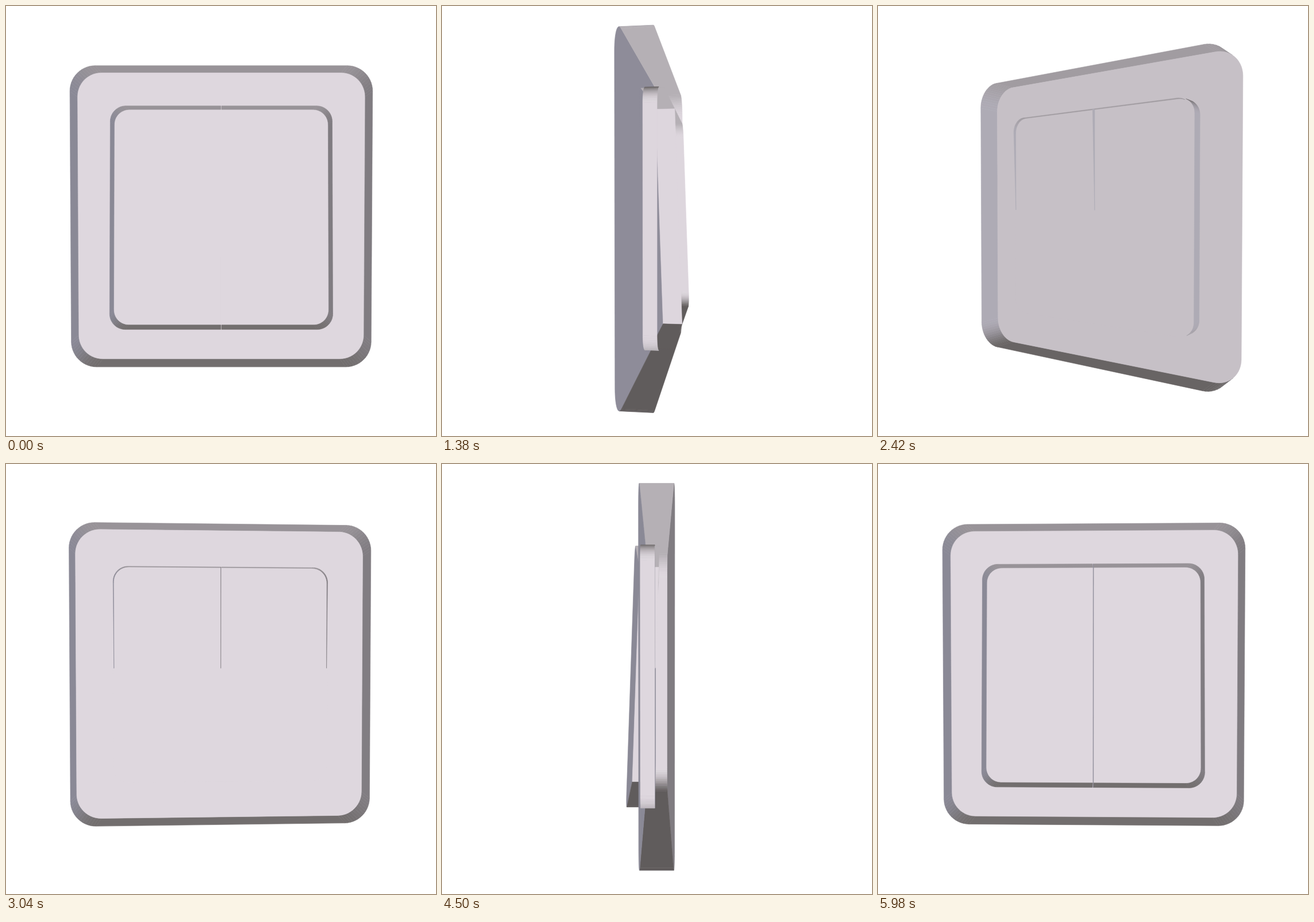
An HTML page with a canvas for the animation above (6 s loop, 748x748 px).

```html
<!DOCTYPE html>
<html lang="en">
<head>
<meta charset="utf-8">
<title>Rotating switch</title>
<style>
html, body { margin: 0; height: 100%; overflow: hidden; background: #fff; }
canvas { display: block; }
</style>
</head>
<body>
<canvas id="stage" width="748" height="748"></canvas>
<script>
const ctx = document.getElementById('stage').getContext('2d');
const LOOP = 6000, STEP = 20;
const CX = 374.4, CY = 366.8, DIST = 910, PITCH = 0.02;
const FRONT = -23.4, BACK = 21.8, FLOOR = -3.5, TILT = 0.035;
const rockerFront = y => -37 - TILT * y;
const rockerBack = y => -3.9 - TILT * y;
const level = w => () => w;
let cos = 1, sin = 0;

// Clockwise rounded rectangle with separate left and right corner radii.
function outline(x0, x1, h, rl, rr) {
  const pts = [];
  const corner = (x, y, r, start) => {
    const n = r ? 14 : 0;
    for (let i = 0; i <= n; i++) {
      const a = (start + (n ? i / n : 0)) * Math.PI / 2;
      pts.push([x + r * Math.cos(a), y + r * Math.sin(a)]);
    }
  };
  corner(x0 + rl, rl - h, rl, 2);
  corner(x1 - rr, rr - h, rr, 3);
  corner(x1 - rr, h - rr, rr, 0);
  corner(x0 + rl, h - rl, rl, 1);
  return pts;
}

const plate = outline(-255.3, 255.3, 255.3, 43, 43);
const hole = outline(-187.3, 187.3, 187.5, 26, 26);
const rockers = [outline(-185.7, -0.6, 186.4, 26, 0), outline(0.6, 185.7, 186.4, 0, 26)];
// Upper part of each rocker that reaches below the recess floor.
const sinkY = (rockerBack(0) - FLOOR) / TILT;
const sunk = rockers.map(pts => pts.map(([x, y]) => [x, Math.min(y, sinkY)]));

function project(x, y, w) {
  const depth = x * sin + w * cos;
  const s = DIST / (DIST + depth + y * PITCH);
  return [CX + (x * cos - w * sin) * s, CY + (y - depth * PITCH) * s];
}

const mix = (a, b, k) => a.map((v, i) => v + (b[i] - v) * k);

// Colour for a local normal that points towards the viewer.
function shade(nx, ny, nw) {
  const side = nx * cos - nw * sin;
  const len = Math.hypot(nx, nw) || 1;
  const facing = Math.max(0, -(nx * sin + nw * cos) / len);
  let c = mix(side > 0 ? [138, 137, 150] : [128, 124, 129], [222, 215, 222], facing ** 1.5);
  if (ny) {
    const v = ny > 0 ? 152 + 29 * sin * sin : 96 + 18 * cos ** 4;
    c = mix(c, ny > 0 ? [v, v - 5, v] : [v, v - 4, v - 4], ny * ny);
  }
  return `rgb(${c.map(Math.round)})`;
}

function area(p) {
  return p.reduce((sum, [x, y], i) => {
    const [u, v] = p[(i + 1) % p.length];
    return sum + x * v - u * y;
  }, 0);
}

function paint(loops, color) {
  ctx.beginPath();
  for (const loop of loops) {
    loop.forEach(([x, y], i) => i ? ctx.lineTo(x, y) : ctx.moveTo(x, y));
    ctx.closePath();
  }
  ctx.fillStyle = ctx.strokeStyle = color;
  ctx.fill('evenodd');
  ctx.stroke();
}

const flat = (pts, w) => pts.map(([x, y]) => project(x, y, w(y)));

// Only surfaces turned away from the viewer are drawn; dir is -1 for a recess.
function walls(pts, front, back, dir = 1) {
  const f = flat(pts, front), b = flat(pts, back);
  pts.forEach(([x, y], i) => {
    const j = (i + 1) % pts.length;
    const dx = pts[j][0] - x, dy = pts[j][1] - y, len = Math.hypot(dx, dy);
    const quad = [f[j], f[i], b[i], b[j]];
    if (len > 1e-6 && area(quad) * dir < -0.01)
      paint([quad], shade(-dir * dy / len, dir * dx / len, 0));
  });
}

function frontCap(pts, w, inner) {
  const cap = flat(pts, w);
  if (area(cap) < 0) paint(inner ? [cap, flat(inner, w)] : [cap], shade(0, 0, 1));
}

function backCap(pts, w) {
  const cap = flat(pts, w);
  if (area(cap) > 0) paint([cap], shade(0, 0, -1));
}

function drawPlate() {
  backCap(plate, level(BACK));
  walls(plate, level(FRONT), level(BACK));
  frontCap(plate, level(FRONT), hole);
}

function drawRocker(pts) {
  backCap(pts, rockerBack);
  frontCap(pts, rockerFront);
  walls(pts, rockerFront, rockerBack);
}

function draw(time) {
  const turn = time / LOOP * 2 * Math.PI;
  cos = Math.cos(turn);
  sin = Math.sin(turn);
  ctx.fillStyle = '#fff';
  ctx.fillRect(0, 0, 748, 748);
  ctx.lineWidth = 0.6;
  ctx.lineJoin = 'round';

  const farFirst = sin > 0 ? [1, 0] : [0, 1];
  const fromBehind = -DIST * cos > FLOOR;
  if (!fromBehind) drawPlate();
  farFirst.forEach(i => drawRocker(rockers[i]));
  if (fromBehind) {
    drawPlate();
    frontCap(hole, level(FLOOR));
  }
  walls(hole, level(FRONT), level(FLOOR), -1);
  if (fromBehind) farFirst.forEach(i => walls(sunk[i], level(FLOOR), rockerBack));
}

const start = performance.now();
function tick() {
  const t = (performance.now() - start) % LOOP;
  draw(Math.floor(t / STEP) * STEP);
  requestAnimationFrame(tick);
}
tick();
</script>
</body>
</html>
```
